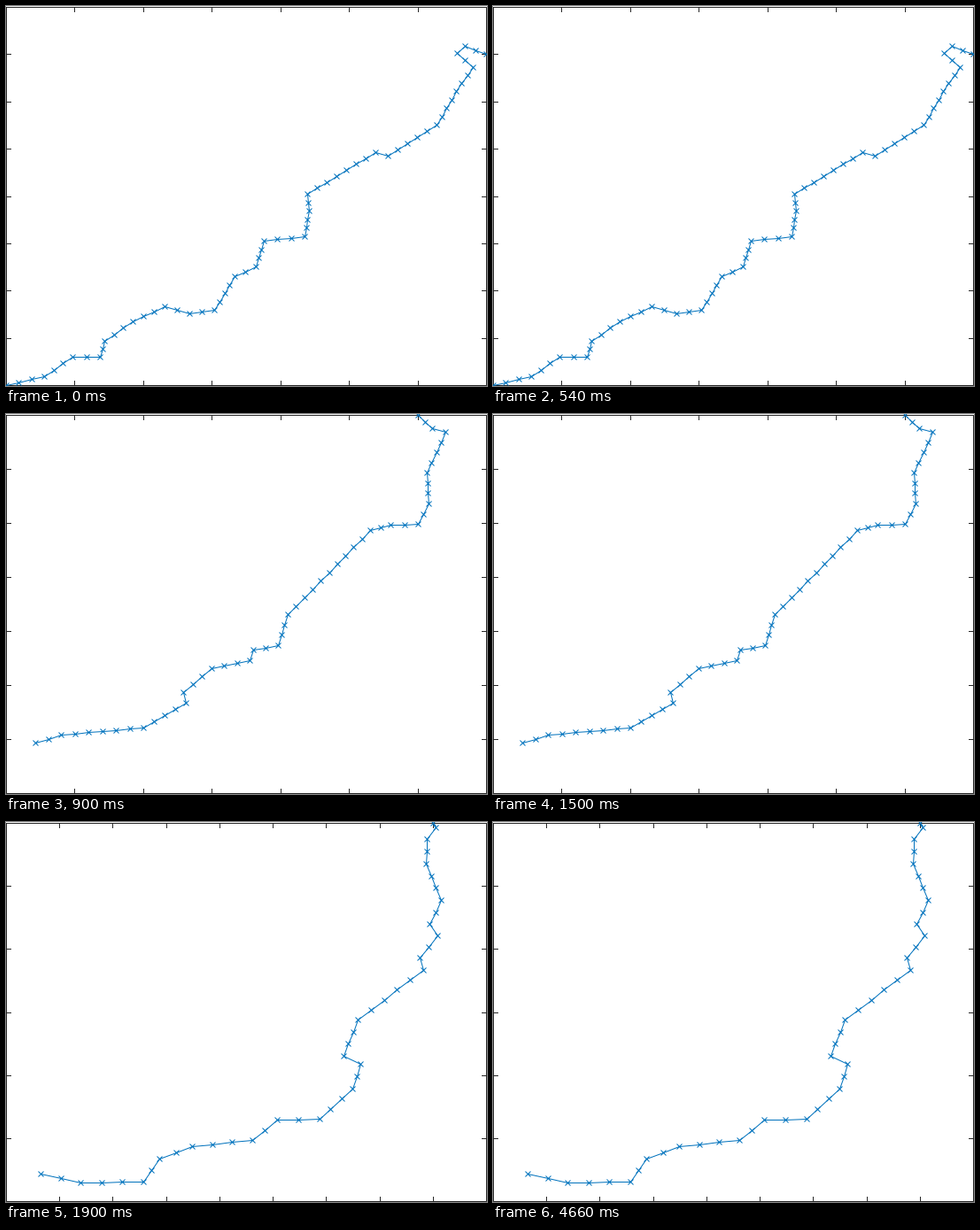
A matplotlib script for the animation above (6.5 s loop, 543x429 px).

```python
import numpy as np
import matplotlib.pyplot as plt
from matplotlib.animation import FuncAnimation
from matplotlib.collections import LineCollection

W, H, DPI = 543, 429, 128
PX = 72 / DPI  # one pixel in points
STEP = 100     # ms per frame
INK, BLUE = "#262626", "#0072BD"
LEFT, TOP, RIGHT, BOTTOM = 0, 1, W - 1, H - 1
TICK = 5

# Main turns of the three walks, in pixels
dense = [(0, 428), (43, 418), (75, 396), (106, 396), (111, 378), (143, 356),
         (179, 339), (207, 347), (235, 343), (258, 305), (282, 294),
         (291, 265), (337, 260), (342, 231), (340, 212), (417, 165),
         (431, 169), (486, 134), (514, 87), (527, 69), (509, 53), (518, 45),
         (542, 54)]
medium = [(33, 371), (62, 362), (155, 354), (203, 326), (200, 314),
          (232, 287), (275, 278), (279, 266), (307, 261), (318, 226),
          (411, 131), (434, 125), (465, 124), (477, 101), (475, 66),
          (496, 20), (481, 16), (465, 1)]
sparse = [(39, 397), (84, 407), (155, 406), (173, 380), (210, 366),
          (278, 359), (306, 336), (354, 335), (391, 301), (400, 273),
          (381, 264), (397, 223), (471, 167), (467, 153), (487, 128),
          (478, 115), (491, 88), (474, 47), (475, 19), (485, 6), (482, 1)]


def walk(turns, unit):
    """Split every leg between turns into steps about one unit long."""
    turns = np.array(turns, float)
    pts = [turns[:1]]
    for a, b in zip(turns, turns[1:]):
        n = max(1, round(np.hypot(*((b - a) / unit))))
        pts.append(a + (b - a) * np.arange(1, n + 1)[:, None] / n)
    # just under half a pixel keeps markers and line on the same pixel centre
    return np.floor(np.concatenate(pts) + 0.5) + 0.49


def ticks(dx, dy):
    """Inward ticks on all four sides, dx and dy pixels apart."""
    segs = []
    for x in np.floor(np.arange(LEFT + dx, RIGHT - 1, dx) + 0.5):
        segs += [[(x, TOP), (x, TOP + TICK)],
                 [(x, BOTTOM), (x, BOTTOM - TICK)]]
    for y in np.floor(np.arange(TOP + dy, BOTTOM - 1, dy) + 0.5):
        segs += [[(LEFT, y), (LEFT + TICK, y)],
                 [(RIGHT, y), (RIGHT - TICK, y)]]
    return segs


def view(end, turns, nx, ny, per_x, per_y=5):
    """A plot of nx by ny cells, each per_x by per_y units, shown until end."""
    dx, dy = (RIGHT - LEFT) / nx, (BOTTOM - TOP) / ny
    return end, walk(turns, (dx / per_x, dy / per_y)), ticks(dx, dy)


views = [view(900, dense, 7, 8, 5),
         view(1900, medium, 7, 7, 5),
         view(6500, sparse, 9, 6, 2.5)]

fig = plt.figure(figsize=(W / DPI, H / DPI), dpi=DPI, facecolor="white")
ax = fig.add_axes([0, 0, 1, 1])
ax.set(xlim=(0, W), ylim=(H, 0))
ax.axis("off")

ax.plot([LEFT, RIGHT, RIGHT, LEFT, LEFT], [TOP, TOP, BOTTOM, BOTTOM, TOP],
        color=INK, lw=PX, snap=True, solid_joinstyle="miter",
        solid_capstyle="projecting")
marks = LineCollection([], colors=INK, linewidths=PX, snap=True,
                       capstyle="projecting")
ax.add_collection(marks, autolim=False)
path, = ax.plot([], [], color=BLUE, lw=PX, marker="x",
                ms=6 * PX, mew=PX, zorder=3)


def draw(frame):
    now = frame * STEP
    _, pts, segs = next(v for v in views if now < v[0])
    path.set_data(*pts.T)
    marks.set_segments(segs)
    return marks, path


anim = FuncAnimation(fig, draw, frames=views[-1][0] // STEP, interval=STEP,
                     repeat=True, repeat_delay=0)
plt.show()
```
